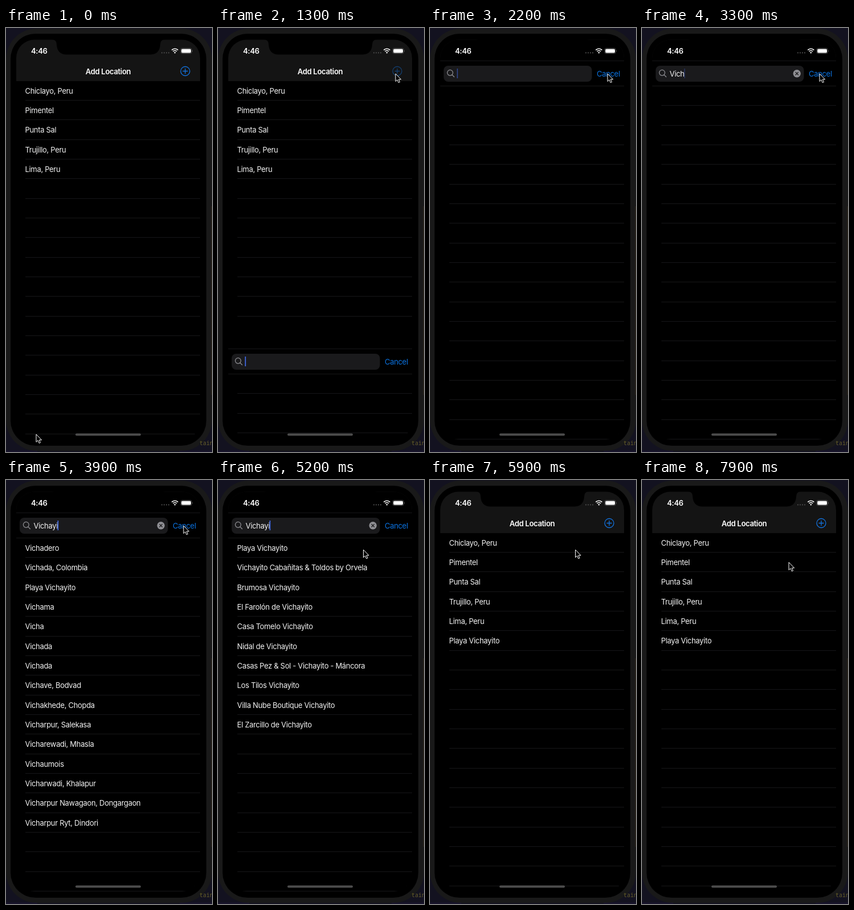
Write an HTML page that moves like this. It is 362 px wide and 742 px high and loops after 8 s.

```html
<!DOCTYPE html>
<html lang="en">
<head>
<meta charset="utf-8">
<title>Add Location</title>
<style>
html, body { margin: 0; height: 100%; overflow: hidden; background: #131220; }
svg { display: block; width: 100vw; height: 100vh; }
text { font: 400 13px Inter, Roboto, sans-serif; letter-spacing: -.32px; fill: #f4f4f4; white-space: pre; }
.bold { font-weight: 600; font-size: 13.1px; letter-spacing: -.36px; fill: #fff; }
.code { font: 10px "Noto Sans Mono", "DejaVu Sans Mono", monospace; letter-spacing: 0; fill: #655d2a; }
.blue { fill: #0b74e4; }
.sep { fill: #161618; }
.line { fill: none; stroke-linecap: round; }
</style>
</head>
<body>
<svg viewBox="0 0 362 742">
  <defs>
    <clipPath id="screen"><rect x="18" y="20.5" width="323" height="699.5" rx="32"/></clipPath>
  </defs>

  <!-- desktop and phone body -->
  <path d="M0 740h55v1H0zM305 740h57v1h-57z" fill="#1b1538"/>
  <rect y="1" width="362" height="739" rx="54" fill="#191919"/>
  <path d="M360.500 312h1.500v330h-1.500z" fill="#28241a"/>
  <rect x="8" y="10" width="344" height="721" rx="44"/>
  <text class="code" x="340" y="730">tain</text>

  <g clip-path="url(#screen)">
    <rect x="18" y="20" width="323" height="73" fill="#141414"/>
    <text class="bold" x="179.500" y="80.700" text-anchor="middle">Add Location</text>
    <g id="plus" class="line" stroke="#1272de" stroke-width="1.300">
      <circle cx="315" cy="75.500" r="8"/>
      <path d="M311 75.500h8M315 71.500v8"/>
    </g>
    <g id="places"></g>

    <g id="panel">
      <rect x="18" y="20" width="323" height="701"/>
      <path class="sep" d="M18 57h323v1H18zM18 101h323v1H18z"/>
      <rect x="24" y="66" width="260.500" height="28" rx="8" fill="#1a1a1c"/>
      <path class="line" d="M40.200 78.300a4.900 4.900 0 1 0-9.800 0a4.900 4.900 0 1 0 9.800 0M38.800 81.900l3.600 3.600" stroke="#8e8e93" stroke-width="1.300"/>
      <text id="query" x="48.500" y="84.700"></text>
      <rect id="caret" y="71" width="1.800" height="17" fill="#4068e0"/>
      <g id="clear">
        <circle cx="272.200" cy="79.700" r="6.700" fill="#8e8e93"/>
        <path class="line" d="M269.900 77.400l4.600 4.600m0-4.600l-4.600 4.600" stroke="#1a1a1c" stroke-width="1.300"/>
      </g>
      <text class="blue" x="293" y="84.700">Cancel</text>
      <g id="results"></g>
    </g>
  </g>

  <!-- notch, status bar, home indicator -->
  <path d="M80 20Q89 20 89 29Q90 46.500 107 46.500H253Q270 46.500 271 29Q271 20 280 20V18H80z"/>
  <text class="bold" x="44" y="44.700">4:46</text>
  <g fill="#4a4a4a">
    <circle cx="274" cy="43.400" r="1.100"/><circle cx="278" cy="43.400" r="1.100"/>
    <circle cx="282" cy="43.400" r="1.100"/><circle cx="286" cy="43.400" r="1.100"/>
  </g>
  <g class="line" stroke="#fff" stroke-width="1.700" style="stroke-linecap:butt">
    <path d="M291.300 38.600a7.600 7.600 0 0 1 11 0M293.500 41a4.700 4.700 0 0 1 6.600 0"/>
    <path d="M296.800 44.800l-1.700-1.900a2.500 2.500 0 0 1 3.400 0z" fill="#fff" stroke="none"/>
  </g>
  <rect x="306.900" y="35.500" width="19.400" height="9.200" rx="2.800" fill="none" stroke="#5c5c5c" stroke-width=".8"/>
  <rect x="308.200" y="36.800" width="16.800" height="6.600" rx="1.600" fill="#fff"/>
  <path d="M327.200 38.700q1.500 1.500 0 3z" fill="#777"/>
  <rect x="122" y="709.500" width="115" height="4" rx="2" fill="#4c4c4c"/>

  <path id="cursor" d="M0 0V13.500L3 10.700L5.200 15.600L7.500 14.600L5.300 10H9.600Z" stroke="#fff" stroke-linejoin="round"/>
</svg>
<script>
const $ = id => document.getElementById(id);
const LOOP = 8000, TICK = 100, ROW = 34.33, TRAVEL = 700;
const OPEN = 1242, CLOSE = 5420, TYPE = 2850, KEY = 145;

const saved = ["Chiclayo, Peru", "Pimentel", "Punta Sal", "Trujillo, Peru", "Lima, Peru"];
const early = ["Vichadero", "Vichada, Colombia", "Playa Vichayito", "Vichama", "Vicha",
  "Vichada", "Vichada", "Vichave, Bodvad", "Vichakhede, Chopda", "Vicharpur, Salekasa",
  "Vicharewadi, Mhasla", "Vichaumois", "Vicharwadi, Khalapur",
  "Vicharpur Nawagaon, Dongargaon", "Vicharpur Ryt, Dindori"];
const late = ["Playa Vichayito", "Vichayito Cabañitas & Toldos by Orvela", "Brumosa Vichayito",
  "El Farolón de Vichayito", "Casa Tomelo Vichayito", "Nidal de Vichayito",
  "Casas Pez & Sol - Vichayito - Máncora", "Los Tilos Vichayito",
  "Villa Nube Boutique Vichayito", "El Zarcillo de Vichayito"];

// time, x, y of the pointer tip
const path = [[0, 53, 711], [350, 160, 489], [650, 288, 198], [800, 304, 100], [950, 312, 80],
  [4600, 312, 80], [5100, 255.5, 122], [6400, 255.5, 122], [7200, 255, 143],
  [7500, 259, 143], [7700, 258, 144], [LOOP, 258, 144]];

function add(parent, tag, attrs) {
  const el = document.createElementNS("http://www.w3.org/2000/svg", tag);
  for (const key in attrs) el.setAttribute(key, attrs[key]);
  return parent.appendChild(el);
}

// An empty table; returns a function that fills its rows.
function table(parent, top) {
  const cells = [];
  for (let i = 0; i < 18; i++) {
    const y = top + i * ROW;
    add(parent, "rect", { class: "sep", x: 34, y: Math.floor(y + ROW), width: 307, height: 1 });
    cells.push(add(parent, "text", { x: 33.5, y: Math.round(y + 22.5) }));
  }
  return items => cells.forEach((cell, i) => cell.textContent = items[i] || "");
}

const showPlaces = table($("places"), 92.2);
const showResults = table($("results"), 101.5);

function spring(ms) {
  const x = Math.max(0, ms) * .018;
  return 1 - Math.exp(-x) * (1 + x);
}

function pointer(t) {
  const i = path.findIndex(p => p[0] > t);
  const [t0, x0, y0] = path[i - 1], [t1, x1, y1] = path[i];
  const k = (t - t0) / (t1 - t0);
  return [x0 + (x1 - x0) * k, y0 + (y1 - y0) * k];
}

function draw(t) {
  const shift = Math.round(TRAVEL * (1 - spring(t - OPEN) + spring(t - CLOSE)));
  $("panel").setAttribute("transform", `translate(0 ${shift})`);
  $("panel").style.display = shift < TRAVEL - 2 ? "" : "none";
  $("plus").style.opacity = t >= 1200 && t < 1600 ? .45 : 1;

  const typed = "Vichayi".slice(0, Math.max(0, Math.ceil((t - TYPE) / KEY)));
  $("query").textContent = typed;
  $("clear").style.display = typed ? "" : "none";
  $("caret").setAttribute("x", 47.3 + (typed && $("query").getComputedTextLength() + .6));
  $("caret").style.opacity = .65 + .35 * Math.cos(2 * Math.PI * t / 1300);

  showResults(t < 3500 ? [] : t < 4100 ? early : late);
  showPlaces(t < CLOSE ? saved : [...saved, late[0]]);
  $("cursor").setAttribute("transform", `translate(${pointer(t)})`);
}

let last = -1;
function frame() {
  const t = Math.floor(performance.now() % LOOP / TICK) * TICK;
  if (t !== last) draw(last = t);
  requestAnimationFrame(frame);
}
frame();
</script>
</body>
</html>
```
